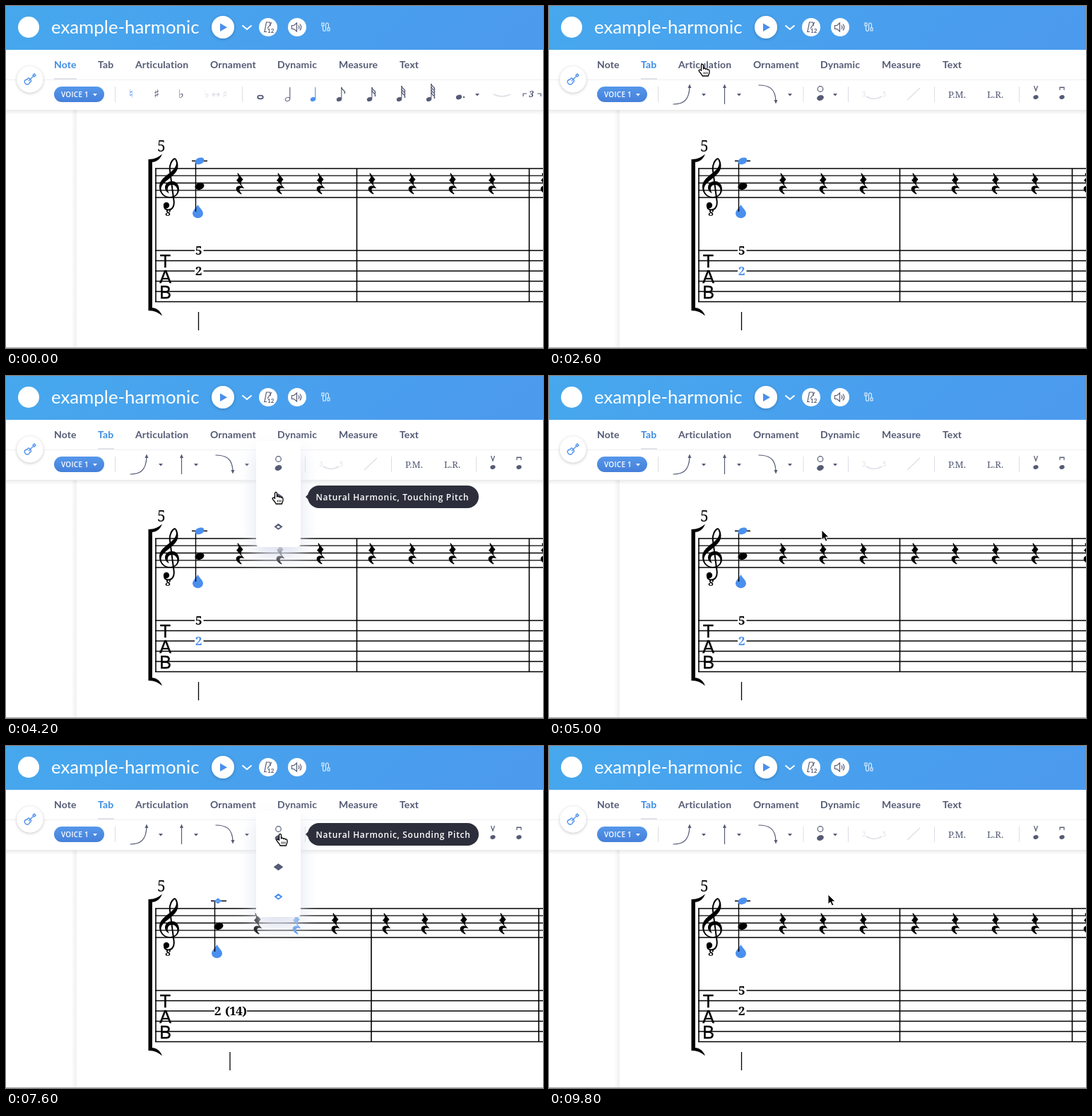
These frames come from a looping animation (760 px wide and 484 px high, 10 s). An HTML page:

```html
<!DOCTYPE html>
<html lang="en">
<head>
<meta charset="utf-8">
<title>Harmonics in a tab editor</title>
<style>
html, body { margin: 0; width: 100%; height: 100%; overflow: hidden; background: #fff; }
svg { display: block; width: 760px; height: 484px; }
.ui { font-family: Lato, sans-serif; }
.tip { font: 600 12px "Open Sans", sans-serif; letter-spacing: .7px; fill: #fff; }
.serif { font-family: "Noto Serif", serif; }
.music { font-family: "DejaVu Sans", sans-serif; text-anchor: middle; }
</style>
</head>
<body>
<svg id="stage" viewBox="0 0 760 484" xmlns="http://www.w3.org/2000/svg">
<defs>
  <linearGradient id="sky" x2="1" y2=".1"><stop stop-color="#46a8ed"/><stop offset="1" stop-color="#4b9aee"/></linearGradient>
  <linearGradient id="pill" x2="0" y2="1"><stop stop-color="#5597ea"/><stop offset="1" stop-color="#4580da"/></linearGradient>
  <linearGradient id="fall" x2="0" y2="1"><stop stop-color="#000" stop-opacity=".08"/><stop offset="1" stop-color="#000" stop-opacity="0"/></linearGradient>
  <linearGradient id="edge"><stop stop-color="#000" stop-opacity="0"/><stop offset="1" stop-color="#000" stop-opacity=".06"/></linearGradient>
  <filter id="blur" x="-1" y="-1" width="3" height="3"><feGaussianBlur stdDeviation="13"/></filter>
  <filter id="soft" x="-.5" y="-.5" width="2" height="2"><feDropShadow dx="0" dy="1" stdDeviation="2" flood-opacity=".25"/></filter>
</defs>
</svg>
<script>
const BLUE = '#4a8fee', INK = '#555b75', PALE = '#dcdee5';
const LOOP = 10000, STEP = 200;

const line = (x1, y1, x2, y2, c = '#000', w = 1.3) =>
  `<path d="M${x1} ${y1}L${x2} ${y2}" stroke="${c}" stroke-width="${w}"/>`;
const fill = (d, c = '#000', more = '') => `<path d="${d}" fill="${c}" ${more}/>`;
const curve = (d, c = INK, w = 1.2) => `<path d="${d}" fill="none" stroke="${c}" stroke-width="${w}"/>`;
const disc = (x, y, r, c = '#fff', more = '') => `<circle cx="${x}" cy="${y}" r="${r}" fill="${c}" ${more}/>`;
const text = (x, y, s, size, c, more = '') =>
  `<text x="${x}" y="${y}" font-size="${size}" fill="${c}" ${more}>${s}</text>`;
const group = (id, body, more = '') => `<g id="${id}" ${more}>${body}</g>`;
const at = (x, y, body) => `<g transform="translate(${x} ${y})">${body}</g>`;
const head = (x, y, rx, ry, c = '#000', more = '') =>
  `<ellipse rx="${rx}" ry="${ry}" fill="${c}" transform="translate(${x} ${y}) rotate(-20)" ${more}/>`;
const caret = x => fill(`M${x - 3} 124h6l-3 3.5z`, INK);
const divider = x => line(x, 114, x, 136, PALE, 1);
const diamond = (x, y, w, h) => `M${x - w} ${y}L${x} ${y - h}L${x + w} ${y}L${x} ${y + h}Z`;
const openDiamond = (x, y, c) => fill(diamond(x, y, 6, 4.5) + diamond(x, y + .3, 2.8, 1.9), c, 'fill-rule="evenodd"');
const naturalIcon = (x, y) => `<circle cx="${x}" cy="${y}" r="3.8" fill="none" stroke="${INK}" stroke-width="1.2"/>`
  + head(x, y + 12.5, 5, 3.8, INK);

function header() {
  return `<rect width="760" height="62" fill="url(#sky)"/>`
    + disc(32, 30, 15)
    + text(64, 39, 'example-harmonic', 25.8, '#fff', 'class="ui"')
    + disc(307, 30, 16, '#fff', 'filter="url(#soft)"') + fill('M303 24.5l10 5.7l-10 5.7z', BLUE)
    + curve('M334.5 27.5l6.5 5.5l6.5 -5.5', '#fff', 2)
    + disc(371, 30, 13)
    + curve('M366 36l2.500 -13h5l1 5M365 36.500h4M370 32l6 -9', INK, 1.2)
    + text(370, 38, '12', 8, INK, 'class="ui" font-weight="bold"')
    + disc(412, 30, 13)
    + curve('M404.500 27.500h3l4 -3.500v12l-4 -3.500h-3zM414 27.500q2 2.500 0 5M416 25.500q3.500 4.500 0 9', INK, 1.2)
    + curve('M447 24v4h3v-4zM448.500 28v5q0 2.500 2 2.500t2 -2.500v-6q0 -3 2 -3t2 3v4M455 31h3v4h-3z', '#e6f3ff', 1.1);
}

const TABS = [['Note', 68], ['Tab', 130], ['Articulation', 183], ['Ornament', 289],
  ['Dynamic', 384], ['Measure', 471], ['Text', 557]];

function bars() {
  return `<rect y="62" width="760" height="85" fill="#fff"/><rect y="147" width="760" height="7" fill="url(#fall)"/>`
    + line(0, 104.5, 760, 104.5, '#eff0f3', 1)
    + TABS.map(([s, x]) => text(x, 88, s, 14, INK, `id="tab${s}" class="ui" font-weight="bold" letter-spacing=".15"`)).join('')
    + '<rect id="underline" y="102" height="2" fill="#e0e3ea"/>'
    + disc(34, 104, 18.5, '#fff', 'filter="url(#soft)"')
    + curve('M33 102.500c-1 -1 -3 0 -3 1.500c-4 0 -5 4 -2.500 6s6 1 6 -2c2 0 2.500 -2 1.500 -3.500zM32 106l7 -7M38 98l2 -2l2 2l-2 2z', BLUE, 1.4)
    + '<rect x="68" y="114" width="71" height="22" rx="11" fill="url(#pill)"/>'
    + text(78, 129, 'VOICE 1', 10, '#fff', 'font-family="Open Sans, sans-serif" font-weight="600" letter-spacing=".25"')
    + fill('M123 124h6l-3 3.500z', '#fff') + divider(154.5);
}

// Small toolbar note: stem from top down to the head, with flags
function smallNote(x, top, flags, c = INK, hollow = false) {
  let s = head(x - 2.5, 132, 3.3, 2.5, hollow ? '#fff' : c, `stroke="${c}"`) + line(x + .8, top, x + .8, 131, c, 1.1);
  for (let i = 0; i < flags; i++) s += curve(`M${x + .8} ${top + i * 4}q.500 3 3 4.500t1.500 4.500`, c, 1.4);
  return s;
}

function noteTools() {
  const sign = (x, s, c, size = 17) => text(x, 130, s, size, c, 'class="music"');
  return sign(177, '♮', BLUE) + sign(213, '♯', INK) + sign(248, '♭', INK)
    + sign(284, '♭', PALE, 15) + sign(297, '↔', PALE, 15) + sign(310, '♯', PALE, 15)
    + divider(334.5)
    + `<ellipse cx="360" cy="129" rx="3.800" ry="2.300" fill="#fff" stroke="${INK}" stroke-width="1.800"/>`
    + smallNote(401, 115, 0, INK, true) + smallNote(437, 115, 0, BLUE)
    + smallNote(474, 115, 1) + smallNote(517, 115, 2) + smallNote(559, 113, 3) + smallNote(601, 110, 4)
    + head(641, 129, 4.2, 3.2, INK) + disc(648, 129, 1.2, INK) + caret(667)
    + curve('M690 125q12 6 24 0', PALE, 1.5)
    + curve('M732 128v-4h5M752 124h5v4', INK, 1.2)
    + text(740, 129, '3', 12, INK, 'class="serif" font-weight="bold" font-style="italic"');
}

function tabTools() {
  const v = (x, d) => curve(d, INK, 1.2) + head(x, 129, 3.7, 2.8, INK);
  return curve('M175.500 139c14 0 23 -5 23.500 -25') + fill('M196.500 116l2.500 -5.500l2.500 5.500z', INK) + caret(219)
    + line(248.5, 139, 248.5, 114, INK, 1.2) + fill('M246 116l2.500 -5.500l2.500 5.500z', INK) + caret(269)
    + curve('M296.500 112c14 0 24 4 24.500 23') + fill('M318.500 133l2.500 5.500l2.500 -5.500z', INK) + caret(341)
    + divider(360) + group('toolNatural', naturalIcon(384, 117.5)) + group('toolTouch', openDiamond(383.5, 129, BLUE))
    + caret(405) + divider(423.5)
    + text(443, 128, '3', 9, PALE, 'class="ui"') + text(472, 128, '5', 9, PALE, 'class="ui"')
    + curve('M449 128q11 7 22 0', PALE, 1.5) + line(507, 133, 525, 116, PALE, 1.2) + divider(545.5)
    + text(565, 130, 'P.M.', 13, INK, 'class="serif"') + text(620, 130, 'L.R.', 13, INK, 'class="serif"') + divider(665.5)
    + v(689, 'M686.500 113l2.500 7l2.500 -7') + v(726, 'M723 119v-4h6v4M723 115.500h6');
}

const REST = 'M-3 -15L4.500 -5.500C1.500 -2.500 1 0 2.500 2.500L6.500 7.500C2 5.500 -1 6.500 -.500 9.500'
  + 'C-.300 11.500 1 13 2.500 14.500L2 15.500C-3 13 -6.500 9.500 -5 6C-3.500 3.500 0 3 2.500 4L-5 -4.500C-1.500 -7.500 -1 -9.500 -3.500 -13Z';
const CLEF = 'M241 222C241 236 217 240 217 256C217 266 224 271.500 231.500 271.500C240 271.500 245 266 245 259.500'
  + 'C245 253 241 248 235 248C229 248 225 252 225 257C225 261 228 264 231 265C229 262 228.500 260 229 257.500'
  + 'C230 254 232 253 235 253C239 253 242.500 256.500 242.500 261C242.500 266.500 238 270 232 270C224 270 219.500 264 219.500 258'
  + 'C221 247 243.500 241 243.500 226C243.500 220 241 215 238.500 215Z';

function staff() {
  const rows = [230, 240.2, 250.5, 260.8, 271, 346, 360.5, 375, 389.5, 404, 418.5];
  return rows.map(y => line(211, y, 760, y)).join('') + line(212, 230, 212, 418.5, '#000', 1.6)
    + '<rect x="201.500" y="217" width="5.500" height="214" fill="#000"/>'
    + fill('M201.500 217C210 217 216 214 221 209.500C218 217 213 221 206 221ZM201.500 431C210 431 216 434 221 438.500C218 431 213 427 206 427Z')
    + fill(CLEF) + curve('M239 216C234 218 231 226 232 233L237.500 275C239 285 234 289 229 288.500C225.500 288 224 286 224 283', '#000', 2)
    + disc(227, 282, 4.2, '#000')
    + text(225.5, 297, '8', 13, '#000', 'class="serif" font-weight="bold" font-style="italic"')
    + text(214, 205.5, '5', 21, '#000', 'class="serif" font-weight="500"')
    + ['T', 'A', 'B'].map((s, i) => text(225.5, 370 + i * 21.8, s, 25, '#000',
      'font-family="Liberation Sans, sans-serif" text-anchor="middle" stroke="#000" stroke-width=".4"')).join('');
}

// One layout of the measures: x of note, rests, bar lines and edit caret
function measures(id, x, rests, barXs, caretX, top, numbers) {
  const drop = `M${x - 2.500} 281C${x} 286 ${x + 5} 289 ${x + 5} 294A7.600 7.600 0 0 1 ${x - 10} 294C${x - 10} 289 ${x - 5} 286 ${x - 2.500} 281Z`;
  return group(id, rests.map((r, i) => at(r, 251, fill(REST, '#000', `id="${id}Rest${i}"`))).join('')
    + barXs.map(b => line(b, 230, b, 418.5, '#000', 1.6)).join('')
    + line(x - 11, 219.3, x + 11, 219.3, '#000', 1.5) + fill(drop, BLUE)
    + line(x - 5.5, 219, x - 5.5, 291, '#000', 1.4) + head(x, 255, 6.6, 4.9) + top + numbers
    + line(caretX, 433, caretX, 459, '#000', 1.3));
}

function score() {
  const gap = (x, y, w) => `<rect x="${x}" y="${y - 3}" width="${w}" height="6" fill="#fff"/>`;
  const fret = (x, y, s, more = '') => text(x, y, s, 17, '#000', `class="serif" font-weight="bold" ${more}`);
  return '<rect x="92" y="147" width="8" height="337" fill="url(#edge)"/>' + staff()
    + measures('plain', 274, [331, 388, 445, 518, 575, 632, 688, 762], [496.5, 740.5], 272.5,
      head(274, 219.3, 6.8, 4.6, BLUE),
      gap(267, 346, 12.5) + gap(267, 375, 12.5) + fret(268, 352.3, '5') + fret(268, 381.3, '2', 'id="fret2"'))
    + measures('harmonic', 301, [356, 411, 466, 538, 593, 648, 703], [517, 754], 317,
      fill(diamond(300, 219.3, 5.5, 4), BLUE) + line(297, 219.3, 303, 219.3, '#9dc3f8', 1),
      gap(295, 375, 46) + fret(295, 381.3, '2') + fret(310, 381.3, '(14)', 'letter-spacing="-.500"'))
    + line(0, 483.5, 760, 483.5, '#a9a9ad', 1);
}

const TIPS = [
  [125, 'Natural Harmonic, Sounding Pitch', 242],
  [171, 'Natural Harmonic, Touching Pitch', 242],
  [209, 'Artificial Harmonic, Touching Pitch', 246]
];

function menu() {
  return group('menu', '<rect x="354" y="106" width="63" height="150" rx="5" fill="#dfe3f0" filter="url(#blur)"/>'
    + '<rect x="354" y="92" width="63" height="150" rx="5" fill="#fff"/>'
    + naturalIcon(385.5, 117.5) + fill(diamond(385.5, 171.3, 6.8, 5), INK)
    + group('itemOff', openDiamond(385.5, 213.3, INK)) + group('itemOn', openDiamond(385.5, 213.3, BLUE)))
    + TIPS.map(([y, s, w], i) => group('tip' + i,
      `<rect x="427" y="${y - 16}" width="${w}" height="32" rx="16" fill="#2c2f3b"/>`
      + fill(`M424 ${y}l6 -6v12z`, '#2c2f3b') + `<text class="tip" x="438.500" y="${y + 4.5}">${s}</text>`)).join('');
}

function pointer() {
  const hand = 'M-1.500 1C-1.500 -1 1.500 -1 1.500 1V6C2 4.500 4.500 4.800 4.500 6.500C5.500 5.300 7.300 5.800 7.300 7.300C8.500 6.500 10 7 10 8.800V11'
    + 'C10 13 8.500 14 8.500 16H0C0 14 -4 11 -5 8.500C-4.500 6.500 -2.500 7 -1.500 8.500Z';
  return group('pointer',
    group('arrow', fill('M0 0V14L3.200 11L5.500 16L8 15L5.700 10H10Z', '#000', 'stroke="#fff" stroke-width="1"'))
    + group('hand', fill(hand, '#fff', 'stroke="#000" stroke-width="1.300" stroke-linejoin="round"')
      + curve('M2.500 10.500v3M4.800 10.500v3M7 10.500v3', '#000', .9)));
}

const stage = document.getElementById('stage');
stage.insertAdjacentHTML('beforeend', '<rect width="760" height="484" fill="#fff"/>' + score() + bars()
  + group('noteTools', noteTools()) + group('tabTools', tabTools()) + header() + menu() + pointer());

const $ = id => document.getElementById(id);
const show = (id, on) => $(id).setAttribute('display', on ? 'inline' : 'none');
const paint = (id, c) => $(id).setAttribute('fill', c);
const within = (t, a, b) => t >= a && t < b;

// Pointer stops: time, x, y
const PATH = [
  [200, 300, 330], [400, 272, 366], [600, 268, 360], [1200, 190, 190], [1800, 140, 84], [2100, 142, 84],
  [2600, 217, 83], [3100, 402, 120], [3300, 400, 120], [3600, 381, 119], [4200, 382, 165], [4700, 384, 211],
  [5000, 386, 218], [5600, 398, 228], [6200, 408, 236], [6600, 408, 236], [6800, 421, 140], [7200, 404, 121],
  [7600, 388, 125], [8000, 405, 213], [8400, 404, 212], [9000, 400, 212], [9800, 395, 210], [10000, 395, 210]
];

function pointerAt(t) {
  const i = Math.max(1, PATH.findIndex(p => p[0] >= t));
  const [t0, x0, y0] = PATH[i - 1], [t1, x1, y1] = PATH[i];
  const u = Math.min(1, Math.max(0, (t - t0) / (t1 - t0))), k = u * u * (3 - 2 * u);
  return [x0 + (x1 - x0) * k, y0 + (y1 - y0) * k];
}

function draw(now) {
  const t = Math.floor(now % LOOP / STEP) * STEP;
  const onTab = t >= 2000, touched = within(t, 5200, 8600);
  const open = within(t, 3200, 5000) || within(t, 7200, 8400);
  const [x, y] = pointerAt(t);

  show('noteTools', !onTab);
  show('tabTools', onTab);
  paint('tabNote', onTab ? INK : '#3c8de4');
  paint('tabTab', onTab ? '#3c8de4' : INK);
  $('underline').setAttribute('x', onTab ? 130 : 68);
  $('underline').setAttribute('width', onTab ? 23 : 32);

  show('plain', !touched);
  show('harmonic', touched);
  show('toolNatural', !touched);
  show('toolTouch', touched);
  paint('fret2', within(t, 400, 5200) ? BLUE : '#000');
  paint('harmonicRest1', t >= 5800 ? BLUE : '#000');

  show('menu', open);
  show('itemOn', touched);
  show('itemOff', !touched);
  const hover = open && x < 395 || t >= 7800 ? (y < 148 ? 0 : y < 192 ? 1 : 2) : -1;
  TIPS.forEach((_, i) => show('tip' + i, open && hover === i));

  const isHand = open || y < 130;
  show('pointer', t >= 200);
  show('hand', isHand);
  show('arrow', !isHand);
  $('pointer').setAttribute('transform', `translate(${x.toFixed(1)} ${y.toFixed(1)})`);
}

const start = performance.now();
function tick() {
  draw(performance.now() - start);
  requestAnimationFrame(tick);
}
tick();
</script>
</body>
</html>
```
